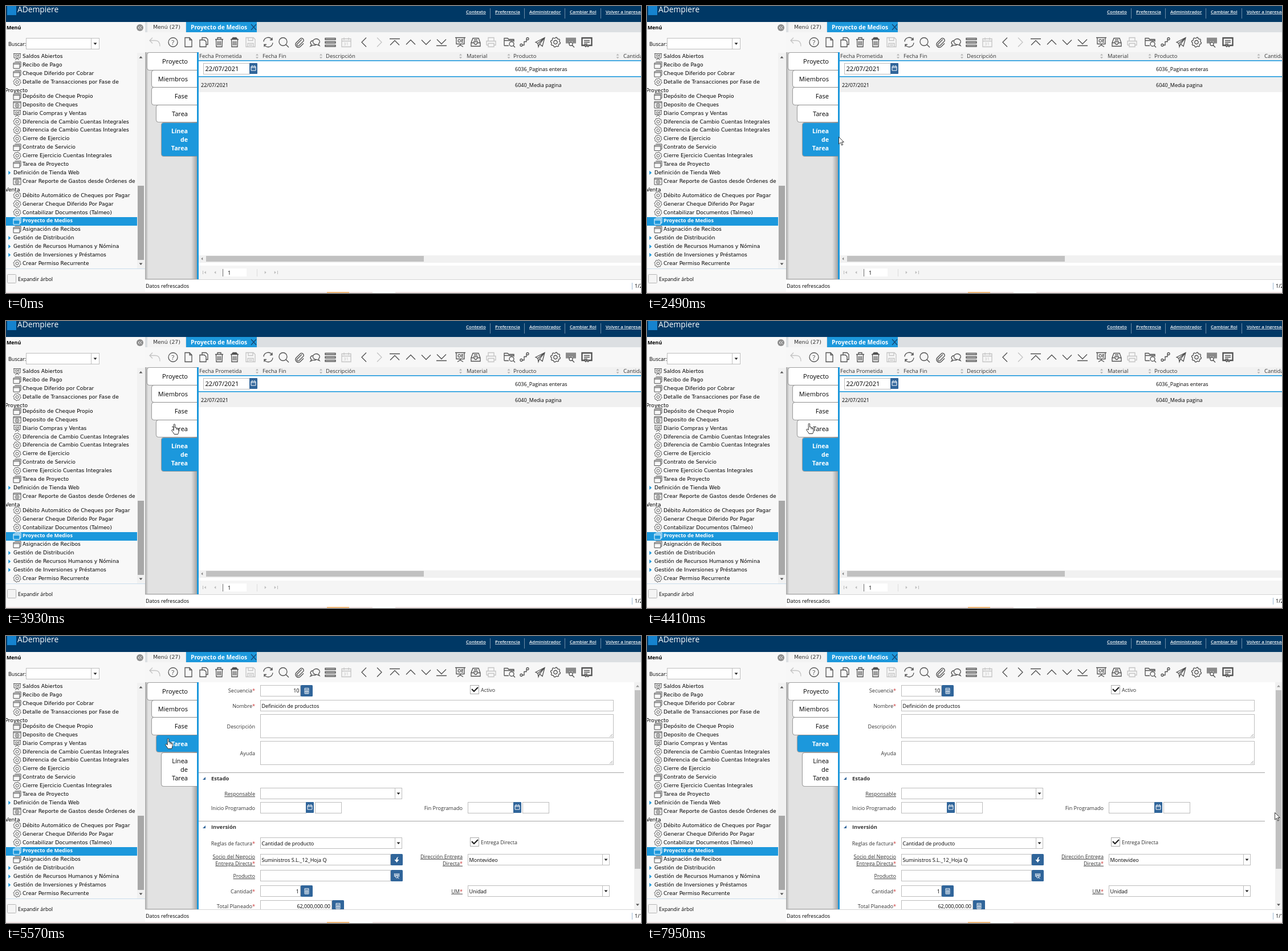
An HTML page for the animation above (8 s loop, 1114 by 503 pixels).

```html
<!DOCTYPE html>
<html lang="es">
<head>
<meta charset="utf-8">
<title>Proyecto de Medios</title>
<style>
html, body { margin: 0; width: 100%; height: 100%; overflow: hidden; background: #fff; }
svg { display: block; }
text { font-family: "Open Sans", "Noto Sans", sans-serif; white-space: pre; }
.menu { font-family: "DejaVu Sans", Verdana, sans-serif; }
.icon { fill: none; stroke: #505050; stroke-width: 1.3; }
.icon text { fill: #505050; stroke: none; }
</style>
</head>
<body>
<svg id="stage" width="1114" height="503" viewBox="0 0 1114 503"></svg>
<script>
const BLUE = '#1c98dc', STEEL = '#30659a', LOOP = 8000;

// Markup helpers; text is placed by its vertical centre
const rect = (x, y, w, h, fill, more = '') => `<rect x="${x}" y="${y}" width="${w}" height="${h}" fill="${fill}" ${more}/>`;
const box = (x, y, w, h) => rect(x + .5, y + .5, w - 1, h - 1, '#fff', 'stroke="#bdbdbd"');
const path = (d, more = '') => `<path d="${d}" ${more}/>`;
const text = (x, y, s, size = 9.05, more = '') => `<text x="${x}" y="${y + size * .36}" font-size="${size}" ${more}>${s}</text>`;
const at = (x, y, body, more = '') => `<g transform="translate(${x} ${y})" ${more}>${body}</g>`;
const tri = (x, y, r, turn, fill = '#555') =>
  path(`M${-r} ${-r / 2}H${r}L0 ${r / 2 + .5}Z`, `transform="translate(${x} ${y}) rotate(${turn})" fill="${fill}"`);
const BOLD = 'font-weight="700"', END = 'text-anchor="end"', LINK = 'text-decoration="underline"';

function gear(r) {
  let d = '';
  for (let i = 0; i < 32; i++) {
    const a = (i + .5) * Math.PI / 16, q = i % 4 < 2 ? r : r * .83;
    d += `${i ? 'L' : 'M'}${(q * Math.cos(a)).toFixed(1)} ${(q * Math.sin(a)).toFixed(1)}`;
  }
  return path(d + 'Z') + `<circle r="${r * .38}"/>`;
}

function header() {
  const links = [[807, 'Contexto'], [858, 'Preferencia'], [918, 'Administrador'], [989, 'Cambiar Rol'], [1052, 'Volver a Ingresar']];
  return rect(0, 0, 1114, 28, '#003865') + rect(2, 0, 16, 16, '#1583cf') +
    text(20, 6, 'ADempiere', 13.8, 'fill="#fff"') +
    links.map(([x, s]) => text(x, 10, s, 7.95, `fill="#fff" font-weight="600" ${LINK}`)).join('') +
    [849, 909, 980, 1043].map(x => rect(x, 4, 1, 18, '#6d8ca8')).join('');
}

const MENU = [
  'r|Saldos Abiertos', 'w|Recibo de Pago', 'w|Cheque Diferido por Cobrar', 'g|Detalle de Transacciones por Fase de|Proyecto',
  'w|Depósito de Cheque Propio', 'p|Deposito de Cheques', 'r|Diario Compras y Ventas',
  'g|Diferencia de Cambio Cuentas Integrales', 'g|Diferencia de Cambio Cuentas Integrales', 'g|Cierre de Ejercicio',
  'w|Contrato de Servicio', 'g|Cierre Ejercicio Cuentas Integrales', 'w|Tarea de Proyecto', 'f|Definición de Tienda Web',
  'p|Crear Reporte de Gastos desde Órdenes de|Venta', 'g|Débito Automático de Cheques por Pagar',
  'g|Generar Cheque Diferido Por Pagar', 'g|Contabilizar Documentos (Talmeo)', 's|Proyecto de Medios', 'w|Asignación de Recibos',
  'f|Gestión de Distribución', 'f|Gestión de Recursos Humanos y Nómina', 'f|Gestión de Inversiones y Préstamos', 'g|Crear Permiso Recurrente'];

const WINDOW = path('M-4-5.5H6.5V3.5H4.5M-6.5-3.5H4.5V6H-6.5ZM-6.5-1.5H4.5');
const SMALL = {
  r: path('M-6.5-5H6.5M-5.5-5V2.5H5.5V-5M0 2.5V4M-3.5 6L0 3.5L3.5 6') + text(-3.7, -1.2, 'OE', 5.5, BOLD),
  w: WINDOW, s: WINDOW,
  g: gear(6.5),
  p: path('M-6.5-5.5H6.5V6H-6.5ZM-6.5-3.5H6.5') + at(0, 1.3, gear(3.6))
};

function sidebar() {
  let out = rect(0, 28, 244, 475, '#f8f8f8') + text(1, 38, 'Menú', 8.9, BOLD) +
    '<circle cx="235" cy="38" r="6" fill="#8d8d8d"/>' + path('M234.5 35.5L232 38L234.5 40.5M238 35.5L235.5 38L238 40.5', 'fill="none" stroke="#fff"') +
    text(4, 67, 'Buscar:') + box(35, 56, 116, 20) + box(149, 56, 15, 20) + tri(156.5, 66, 3, 0, '#222');
  let y = 88;
  for (const row of MENU) {
    const [kind, label, wrap] = row.split('|'), picked = kind == 's';
    if (picked) out += rect(0, Math.round(y) - 6, 230, 15, BLUE);
    out += kind == 'f' ? tri(6, y + .5, 3.5, -90, BLUE) + text(13, y, label, 9.1, 'class="menu"')
      : at(19.5, y + .5, SMALL[kind], `class="icon" style="stroke-width:1${picked ? ';stroke:#fff' : ''}"`) +
        (picked ? text(29, y, label, 9.05, `fill="#fff" ${BOLD}`) : text(29, y, label, 9.1, 'class="menu"'));
    y += 14.9;
    if (wrap) {
      out += text(-1.5, y, wrap, 9.1, 'class="menu"');
      y += 10;
    }
  }
  return out + rect(230, 82, 13, 378, '#f1f1f1') + rect(231, 315, 11, 130, '#a8a8a8') +
    tri(236.5, 90, 3, 180) + tri(236.5, 452, 3, 0) + rect(0, 460, 244, 1, '#c9dcec') +
    rect(2.5, 470.5, 15, 15, '#f4f4f4', 'stroke="#b5b5b5" rx="1"') + text(21, 478.5, 'Expandir árbol', 8.95);
}

const SHEET = 'M-6-8H2L6-4V8H-6ZM2-8V-4H6';
const BIN = 'M-7-5H7M-3-5V-8H3V-5M-5.5-5L-5 8H5L5.5-5M-2.5-2V5.5M0-2V5.5M2.5-2V5.5';
const TOOLS = [
  [261, 'M-4-8L-9-3L-4 2M-9-3H1Q9-3 9 7', 1],
  [293, 'M-8 0A8 8 0 1 0 8 0A8 8 0 1 0-8 0'],
  [320, SHEET], [347, 'M-7-4H1L4-1V8H-7ZM-3-4V-8H4L7-5V4H4'],
  [374, BIN], [401, BIN + 'M-5-6.5H5'],
  [429, 'M-8-8H5L8-5V8H-8ZM-4-8V-3H4V-8M-5 8V2H5V8M-3 5H3', 1],
  [460, 'M-8-1A8 8 0 0 1 7-4M7-8V-4H3M8 1A8 8 0 0 1-7 4M-7 8V4H-3'],
  [487, 'M-8-1A7 7 0 1 0 6-1A7 7 0 1 0-8-1M4 4L9 9'],
  [515, 'M4-5L-4 3A2 2 0 0 0-1 6L7-2A4 4 0 0 0 2-7L-6 1A5 5 0 0 0 1 8L7 2'],
  [542, 'M6 3L8 6L3 4A6 5 0 1 1 6 3M-4-3A5 4 0 0 0-6 4L-8 7L-3 5Q0 6 2 4'],
  [569, 'M-9-7H9V-4.5H-9ZM-9-1H9V1.5H-9ZM-9 5H9V7.5H-9Z'],
  [597, 'M-8-6H8V8H-8ZM-8-2H8M-4-8V-4M4-8V-4', 1],
  [628, 'M4-8L-4 0L4 8'], [655, 'M-4-8L4 0L-4 8', 2],
  [682, 'M-9-6H9M-8 5L0-3L8 5'], [710, 'M-8 4L0-4L8 4'], [737, 'M-8-4L0 4L8-4'], [764, 'M-8-5L0 3L8-5M-9 6H9'],
  [797, 'M-9-8H9M-7-8V3H7V-8M0 3V6M-5 8L0 5L5 8'],
  [824, 'M-8 1L-5-7H5L8 1V7H-8ZM-8 1H-3Q-2 4 0 4Q2 4 3 1H8M-3-4H3M-4-1H4'],
  [851, 'M-5-2V-8H5V-2M-8 5V-2H8V5H5M-5 2H5V8H-5ZM-5 5H-8', 1],
  [883, 'M-9 6V-7H-3L-1-5H8V-1M-9-3H8M-9 6H-1M0 3A4 4 0 1 0 8 3A4 4 0 1 0 0 3M7 6L10 9'],
  [910, 'M-8 5A2 2 0 1 0-4 5A2 2 0 1 0-8 5M-4 5H-1V-1H3V-5M3-6A2 2 0 1 0 7-6A2 2 0 1 0 3-6'],
  [937, 'M-8 0L8-8L4 7L-1 3L-3 8L-4 2ZM-4 2L8-8L-1 3'],
  [964, ''],
  [991, 'M-8-8V2M-6-8V2M-4-8V2M-2-8V-1M0-8V-1M2-8V-1M4-8V2M6-8V2M8-8V2M-3 3A3 3 0 1 0 3 3A3 3 0 1 0-3 3M2 5L6 9'],
  [1019, 'M-9-8H9V6H4L2 8L0 6L-2 8L-4 6H-9ZM-8-7H8V5H-8ZM-5-3H5M-5 0H5M-5 3H1']
];

function toolbar() {
  return rect(244, 28, 870, 18, '#dcdfe2') + rect(248, 28, 67, 18, '#f3f3f3') + text(258, 37, 'Menú (27)', 9.4, 'class="menu" fill="#333"') +
    rect(316, 28, 124, 18, BLUE) + text(324, 37, 'Proyecto de Medios', 10.2, `fill="#fff" ${BOLD}`) +
    path('M430 32L439 42M439 32L430 42', 'stroke="#17456e" stroke-width="1.2"') +
    rect(244, 46, 870, 35, '#f7f7f7') +
    TOOLS.map(([x, d, pale]) => at(x, 63.5, path(d), `class="icon"${pale == 2 ? ' id="next"' : ''}${pale ? ' opacity=".3"' : ''}`)).join('') +
    at(0, 63.5, text(290.3, 0, '?', 11.5) + text(792, -2.5, 'OE', 8, BOLD) + text(592, 3, '31', 8, 'opacity=".3"') + at(964, 0, gear(8.5)), 'class="icon"');
}

const TABS = [[248, 82, 30, 'Proyecto'], [256, 113, 29, 'Miembros'], [256, 143, 30, 'Fase'], [264, 174, 29, 'Tarea'], [273, 205, 58, 'Línea|de|Tarea']];

function tabs(active) {
  return rect(244, 81, 92, 399, 'url(#panel)') + rect(244, 478, 92, 2, '#aaa') + TABS.map(([x, y, h, label], i) => {
    const on = i == active, lines = label.split('|'), mid = lines.length > 1 ? y + 14 : y + h / 2 + .5;
    const shape = `M336 ${y}H${x + 4}Q${x} ${y} ${x} ${y + 4}V${y + h - 4}Q${x} ${y + h} ${x + 4} ${y + h}H336`;
    return path(shape, 'fill="none" stroke="#888" stroke-width="2.2" opacity=".75"') + path(shape, `fill="${on ? BLUE : '#fff'}"`) +
      lines.map((s, k) => text(319, mid + 15 * k, s, on ? 10.7 : 11.05, END + (on ? ` fill="#fff" ${BOLD}` : ''))).join('');
  }).join('') + rect(335, 81, 3, 399, BLUE);
}

const calendar = (x, y) => rect(x, y, 14, 19, STEEL, 'rx="1"') +
  path(`M${x + 3} ${y + 6}H${x + 11}V${y + 13}H${x + 3}ZM${x + 3} ${y + 8}H${x + 11}M${x + 5} ${y + 4}V${y + 6}M${x + 9} ${y + 4}V${y + 6}`, 'fill="none" stroke="#fff"');

function grid() {
  const heads = [[339, 'Fecha Prometida'], [450, 'Fecha Fin'], [561, 'Descripción'], [808, 'Material'], [890, 'Producto'], [1083, 'Cantidad']];
  return rect(338, 81, 776, 399, '#fff') + rect(338, 81, 776, 14, '#f1f1f1') +
    heads.map(([x, s]) => text(x, 88, s, 9.5, 'fill="#333"')).join('') +
    [440.5, 552.5, 797.5, 882, 1073].map(x => tri(x, 85.5, 2.5, 180, '#b5b5b5') + tri(x, 90.5, 2.5, 0, '#b5b5b5')).join('') +
    rect(338, 125, 776, 26, '#f0f0f0') + rect(338, 95, 776, 1.6, BLUE) + rect(338, 123, 776, 1.6, BLUE) +
    box(346, 100, 82, 20) + text(349.5, 110, '22/07/2021', 11.1) + calendar(427, 100) +
    text(893, 110.5, '6036_Paginas enteras') + text(342, 138.5, '22/07/2021') + text(893, 138.5, '6040_Media pagina') +
    rect(338, 437, 776, 13, '#f1f1f1') + rect(351, 438, 382, 10, '#c1c1c1') + tri(344, 443, 2.5, 90, '#888') +
    rect(338, 455, 776, 25, '#f5f5f5') + rect(380, 461, 1, 13, '#777') + rect(382, 460, 40, 14, '#fff') + text(389, 467.5, '1', 9.5) +
    rect(440, 461, 1, 13, '#ddd') +
    tri(349.5, 467, 2.5, 90, '#bbb') + tri(367, 467, 2.5, 90, '#bbb') + tri(455, 467, 2.5, -90, '#bbb') + tri(472, 467, 2.5, -90, '#bbb') +
    rect(345, 464, 1, 6, '#bbb') + rect(476, 464, 1, 6, '#bbb');
}

const label = (x, y, s, more = '') => text(x, y, s.replace('*', '<tspan fill="#c33" text-decoration="none">*</tspan>'), 9.05, `${END} fill="#333" ${more}`);
const combo = (x, y, w, s = '') => box(x, y, w, 20) + box(x + w - 13, y, 13, 20) + tri(x + w - 6.5, y + 10, 3, 0, '#222') + text(x + 2.5, y + 10.5, s);
const button = (x, y, body) => rect(x, y, 21, 20, STEEL, 'rx="1.5"') + at(x + 10.5, y + 10, body);
const CALC = path('M-3.5-4.5H3.5V5H-3.5ZM-3.5-2H3.5M-1.2-2V5M1.2-2V5M-3.5 1.5H3.5', 'fill="none" stroke="#fff" stroke-width=".9"');
const check = (x, y, s) => rect(x + .5, y + .5, 15, 15, '#fff', 'stroke="#aaa"') +
  path(`M${x + 3} ${y + 7}L${x + 7} ${y + 11}L${x + 14} ${y + 4}`, 'fill="none" stroke="#222" stroke-width="2.2"') + text(x + 19, y + 9, s, 8.95, 'fill="#333"');
const area = (y, h) => box(446, y, 620, h) + path(`M1059 ${y + h - 2}L1064 ${y + h - 7}M1062 ${y + h - 2}L1064 ${y + h - 4}`, 'stroke="#888" stroke-width=".8"');
const section = (y, s) => rect(338, y, 746, 1, '#a5a5a5') + path(`M345 ${y + 13}h5v-5z`, `fill="${STEEL}"`) + text(360, y + 10.5, s, 9.4, `fill="#333" ${BOLD}`);
const dates = (x, y) => box(x, y, 81, 20) + calendar(x + 80, y) + box(x + 96, y, 47, 20);

function form() {
  return rect(338, 81, 776, 399, '#fff') +
    label(437, 96, 'Secuencia*') + box(446, 86, 71, 20) + text(514.5, 96, '10', 9.05, END) + button(517, 86, CALC) + check(814, 86, 'Activo') +
    label(437, 123, 'Nombre*') + box(446, 112, 620, 20) + text(448.5, 123, 'Definición de productos') +
    label(437, 158.5, 'Descripción') + area(137, 42) + label(437, 206, 'Ayuda') + area(184, 42) +
    section(239, 'Estado') + label(437, 277, 'Responsable', LINK) + combo(446, 266, 249) +
    label(437, 301.5, 'Inicio Programado') + dates(446, 291) + label(801, 301.5, 'Fin Programado') + dates(810, 291) +
    section(324, 'Inversión') + label(437, 363.5, 'Reglas de factura*') + combo(446, 353, 249, 'Cantidad de producto') + check(814, 353, 'Entrega Directa') +
    label(437, 386.5, 'Socio del Negocio', LINK) + label(437, 398.5, 'Entrega Directa*', LINK) +
    box(446, 382, 229, 20) + text(448.5, 393, 'Suministros S.L._12_Hoja Q') +
    button(675, 382, path('M3-5Q-1-4-1 0H-4L0 5L4 0H1Q1-3 3-5Z', 'fill="#fff"')) +
    label(801, 386.5, 'Dirección Entrega', LINK) + label(801, 398.5, 'Directa*', LINK) + combo(810, 382, 249, 'Montevideo') +
    label(437, 421, 'Producto', LINK) + box(446, 410, 229, 20) +
    button(675, 410, path('M-4-4V2M-2-4V2M0-4V0M2-4V2M4-4V2M-2 2A2 2 0 1 0 2 2A2 2 0 1 0-2 2M1 3L4 5', 'fill="none" stroke="#fff"')) +
    label(437, 447.5, 'Cantidad*') + box(446, 437, 71, 20) + text(514, 447.5, '1', 9.05, END) + button(517, 437, CALC) +
    label(801, 447.5, 'UM*', LINK) + combo(810, 437, 249, 'Unidad') +
    label(437, 474, 'Total Planeado*') + box(446, 463, 126, 20) + text(569, 474, '62,000,000.00', 9.05, END) + button(572, 463, CALC) +
    rect(1102, 81, 12, 399, '#f1f1f1') + rect(1103, 95, 10, 313, '#c1c1c1') + tri(1108, 88, 3, 180, '#999') + tri(1108, 471, 3, 0);
}

const footer = () => rect(244, 479, 870, 24, '#fff') + rect(244, 479, 870, 1, '#d5d5d5') + text(245, 491, 'Datos refrescados') +
  rect(1098, 485, 1, 12, '#9bb8d2') + '<text id="count" x="1103" y="494.3" font-size="9.05"></text>' +
  rect(0, 501, 1114, 2, '#f3e6e6') + rect(563, 501, 39, 2, '#f2b878') + rect(643, 501, 40, 2, '#fff', 'id="strip"');

const ARROW = path('M.5.5V13L3.5 10.2L5.6 15L7.6 14.1L5.5 9.5H9.3Z', 'fill="#fff" stroke="#222" stroke-width=".9"');
const HAND = path('M4.2 12V2.2Q4.2.6 5.4.6T6.6 2.2V7Q8.8 6 9 7.6Q11 7 11.2 8.6Q13 8.2 13 10V14Q12.8 16 11.6 18.5H5.2Q3.5 15.2 1.2 12.8Q0 10.6 1.6 10.4Q3 10.5 4.2 12M9 7.8V10.5M11.2 8.8V10.8', 'fill="#fff" stroke="#222" stroke-width=".95"');

const stage = document.getElementById('stage');
stage.innerHTML = '<defs><linearGradient id="panel"><stop stop-color="#a8a8a8"/><stop offset=".06" stop-color="#e2e2e2"/><stop offset=".88" stop-color="#e2e2e2"/><stop offset="1" stop-color="#9c9c9c"/></linearGradient></defs>' +
  sidebar() + header() + toolbar() +
  `<g id="list">${grid() + tabs(4)}</g><g id="task">${form() + tabs(3)}</g>` + footer() +
  `<g id="cursor"><g id="arrow">${ARROW}</g><g id="hand">${HAND}</g></g>`;

const el = id => document.getElementById(id);
const show = (id, on) => el(id).setAttribute('display', on ? 'inline' : 'none');

// Pointer moves: start, end, steps, then evenly timed waypoints
const MOVES = [
  [530, 660, 3, [1085, 487]],
  [1200, 1680, 8, [850, 390], [700, 340], [653, 324]],
  [2150, 2490, 6, [573, 300], [400, 248], [336, 229]],
  [3100, 3860, 12, [312, 196], [273, 175], [266, 180], [277, 173]],
  [3930, 4410, 8, [312, 192], [290, 186], [279, 179]],
  [6380, 6800, 7, [470, 205], [650, 232], [708, 226]],
  [7130, 7410, 5, [850, 240], [1000, 275], [1072, 291]],
  [7740, 7950, 4, [1101, 309]]
];

function pointer(t) {
  let pos = [1114, 503];
  for (const [from, to, steps, ...points] of MOVES) {
    if (t < from) break;
    const step = Math.floor((t - from) / (to - from) * (steps - 1) + .1) + 1;
    const u = Math.min(1, step / steps) * points.length;
    const leg = Math.min(points.length - 1, Math.floor(u)), track = [pos, ...points];
    pos = pos.map((_, k) => track[leg][k] + (track[leg + 1][k] - track[leg][k]) * (u - leg));
  }
  return pos.map(Math.round);
}

function draw() {
  const t = performance.now() % LOOP, opened = t >= 5570, [x, y] = pointer(t);
  const overTabs = x < 335;
  show('list', !opened);
  show('task', opened);
  show('arrow', !overTabs);
  show('hand', overTabs);
  el('cursor').setAttribute('transform', `translate(${x} ${y})`);
  el('next').setAttribute('opacity', opened ? 1 : .3);
  el('count').textContent = opened ? '1/1' : '1/2';
  el('strip').setAttribute('x', t < 5010 ? 643 : 603);
  requestAnimationFrame(draw);
}
draw();
</script>
</body>
</html>
```
